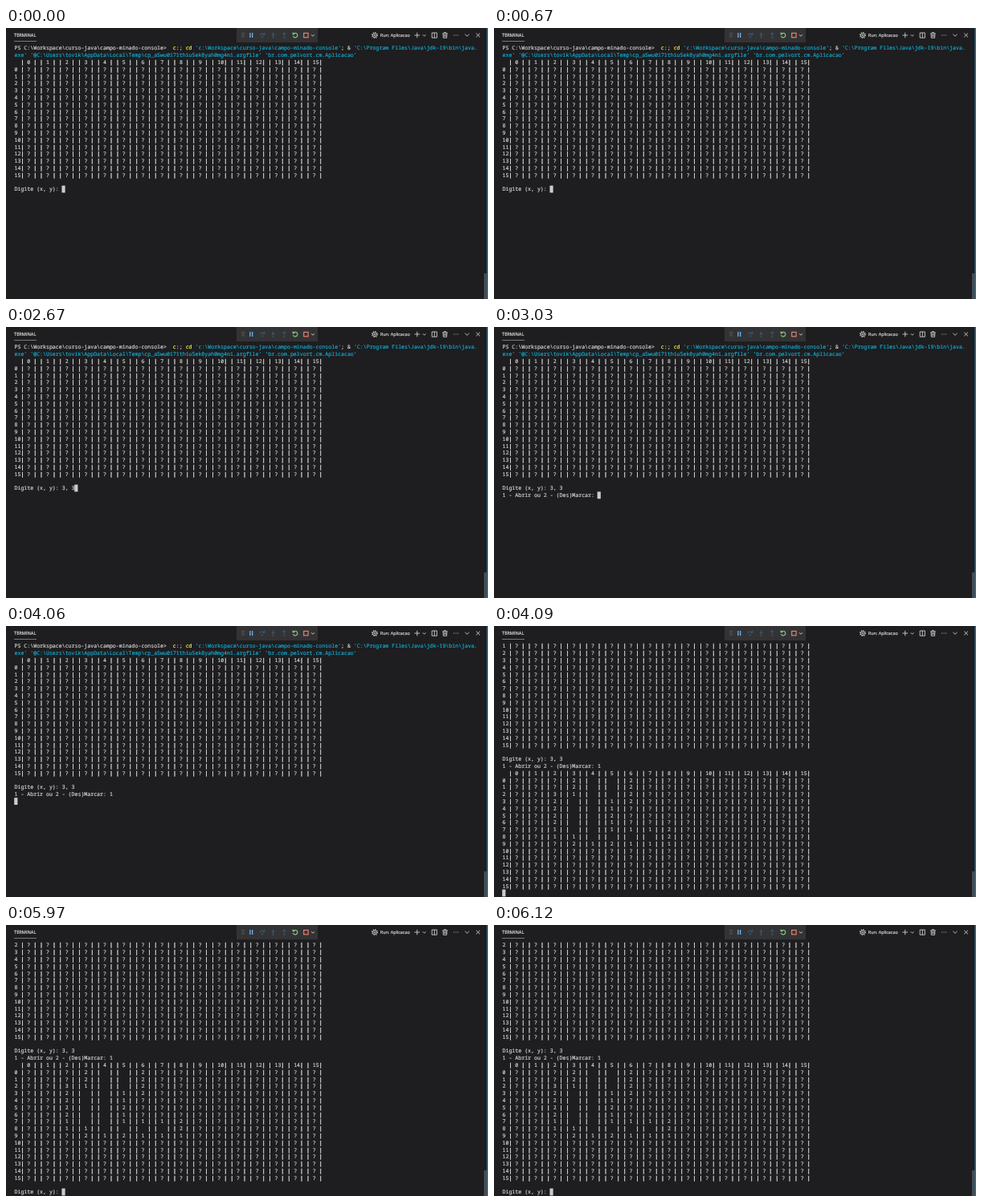
An HTML page that plays this animation: 600x338 px, repeating every 6970 ms.

```html
<!DOCTYPE html>
<html lang="pt">
<head>
<meta charset="utf-8">
<title>Campo minado no terminal</title>
<style>
  html, body { margin: 0; width: 100%; height: 100%; overflow: hidden; background: #1e1d1f; }
  svg { display: block; width: 100%; height: 100%; }
  text { text-rendering: geometricPrecision; white-space: pre; fill: #d0d0d0; stroke: #d0d0d0; stroke-width: .2; }
  #screen { font: 6.58px "Noto Sans Mono", "DejaVu Sans Mono", monospace; }
  #screen .command { fill: #f0f043; stroke: #f0f043; }
  #screen .string { fill: #11a8cd; stroke: #11a8cd; }
  #screen .bar { stroke-width: .5; }
  .label { font: 5.7px "Open Sans", "Noto Sans", sans-serif; }
  .icon { fill: none; stroke: #d0d0d0; stroke-width: .9; }
  .blue { stroke: #75beff; }
  .dim { stroke: #3f607b; }
  .green { stroke: #89d185; }
  .orange { stroke: #f48771; }
</style>
</head>
<body>
<svg viewBox="0 0 600 338">
  <rect width="600" height="338" fill="#1e1d1f"/>
  <g id="screen"></g>
  <rect id="cursor" width="4.2" height="8.8" fill="#cccccc"/>

  <!-- Panel title -->
  <text class="label" x="10" y="11.2" style="fill:#e7e7e7">TERMINAL</text>
  <path d="M10 16.5H38" stroke="#a0a0a0" stroke-width=".7"/>

  <!-- Debug toolbar -->
  <rect x="287" width="101" height="18" fill="#333335"/>
  <path class="icon" style="stroke:#858585" stroke-dasharray="1 1.2" d="M294 6V12.5M296.2 6V12.5"/>
  <path class="icon blue" style="stroke-width:1.2" d="M303.9 6V12M306.7 6V12"/>
  <g class="icon dim">
    <path d="M316 9.5A3.2 3.2 0 0 1 321.6 8M322 5.6V8.4H319.2"/>
    <circle cx="319" cy="11.4" r=".7"/>
    <path d="M332.5 5.5V9.6M330.4 7.7L332.5 9.8L334.6 7.7"/>
    <circle cx="332.5" cy="11.7" r=".7"/>
    <path d="M346.3 10V5.8M344.2 7.8L346.3 5.7L348.4 7.8"/>
    <circle cx="346.3" cy="11.7" r=".7"/>
  </g>
  <path class="icon green" style="stroke-width:1.1" d="M357.7 7.5A2.8 2.8 0 1 1 357.3 9.8M357.2 5.4V7.8H359.6"/>
  <rect class="icon orange" style="stroke-width:1.1" x="370.7" y="6.4" width="5.4" height="5.4"/>
  <path class="icon" d="M380 8.3L382 10.2L384 8.3"/>

  <!-- Panel actions -->
  <g class="icon">
    <circle cx="459" cy="9" r="2.5"/>
    <circle cx="459" cy="9" r=".8"/>
    <circle cx="459" cy="9" r="3.4" stroke-width="1.2" stroke-dasharray="1.2 1.47"/>
    <path d="M508.5 9H515.1M511.8 5.7V12.3M518.8 8.3L520.7 10.2L522.6 8.3"/>
    <path d="M530.2 6H536.4V12.2H530.2ZM533.3 6V12.2"/>
    <path d="M543.3 6.8H549.7M545.4 6.6V5.7H547.6V6.6M544.1 6.9L544.4 12.3H548.6L548.9 6.9M545.8 8V11M547.2 8V11"/>
    <path stroke-dasharray="1 1.6" d="M557.1 9H563.6"/>
    <path d="M571.4 7.8L574 10.3L576.6 7.8M585.2 6.6L590 11.4M590 6.6L585.2 11.4"/>
  </g>
  <text class="label" x="465.8" y="11.2" style="font-size:5.45px">Run: Aplicacao</text>

  <!-- Right edge -->
  <rect x="595" y="306" width="3.5" height="32" fill="#4b4b4e"/>
  <rect x="598.5" width="1.5" height="338" fill="#147bb0"/>
</svg>
<script>
const LOOP = 6970, VISIBLE_LINES = 36;
const LEFT = 10.5, FIRST_MIDDLE = 25, CHAR_WIDTH = 3.948, LINE_HEIGHT = 8.8;
const SIZE = 16;

const span = (kind, text) => `<tspan class="${kind}">${text}</tspan>`;
const command = text => span('command', text);
const string = text => span('string', text);

// Cells not covered by a row of `opened` stay hidden.
function board(opened = []) {
  const indices = [...Array(SIZE).keys()];
  const line = (label, cells) =>
    label.padEnd(2) + cells.map(cell => `| ${cell.padEnd(2)}| `).join('') + '\n';
  return line('', indices.map(String)) + indices.map(row =>
    line(String(row), indices.map(column => opened[row]?.[column] ?? '?'))).join('');
}

const launch =
  'PS C:\\Workspace\\curso-java\\campo-minado-console&gt;  ' +
  command('c:') + '; ' + command('cd') + ' ' +
  string("'c:\\Workspace\\curso-java\\campo-minado-console'") + '; &amp; ' +
  string("'C:\\Program Files\\Java\\jdk-19\\bin\\java.") + '\n' +
  string("exe' '@C:\\Users\\tovik\\AppData\\Local\\Temp\\cp_a5wu0i71thiu5ek8yah0mg4ni.argfile' 'br.com.pelvort.cm.Aplicacao'") + '\n';

const opened = [
  '???2  2', '???2  2', '??31  2', '??2  12', '??2  1',
  '??2  2', '??2  1', '??1  1112', '??11    2', '???212111'
];
const prompt = '\nDigite (x, y): ';

// Terminal output as [time in ms, text]
const output = [
  [0, launch + board() + prompt],
  [2060, '3'], [2250, ','], [2430, ' '], [2670, '3'],
  [2790, '\n'],
  [2820, '1 - Abrir ou 2 - (Des)Marcar: '],
  [3580, '1'],
  [4060, '\n'],
  [4090, board(opened)],
  [4180, prompt]
];

const screen = document.getElementById('screen');
const cursor = document.getElementById('cursor');
let shown = 0;

function show(count) {
  const lines = output.slice(0, count).map(([, text]) => text).join('').split('\n');
  const visible = lines.slice(-VISIBLE_LINES);
  const middle = index => FIRST_MIDDLE + index * LINE_HEIGHT;
  screen.innerHTML = visible.map((line, index) =>
    `<text x="${LEFT}" y="${middle(index) + 2.3}">${line.replaceAll('|', span('bar', '|'))}</text>`).join('');
  cursor.setAttribute('x', LEFT + visible.at(-1).length * CHAR_WIDTH - 0.3);
  cursor.setAttribute('y', middle(visible.length - 1) - LINE_HEIGHT / 2);
}

function tick() {
  const time = performance.now() % LOOP;
  const count = output.filter(([start]) => start <= time).length;
  if (count !== shown) show(shown = count);
  requestAnimationFrame(tick);
}
tick();
</script>
</body>
</html>
```
